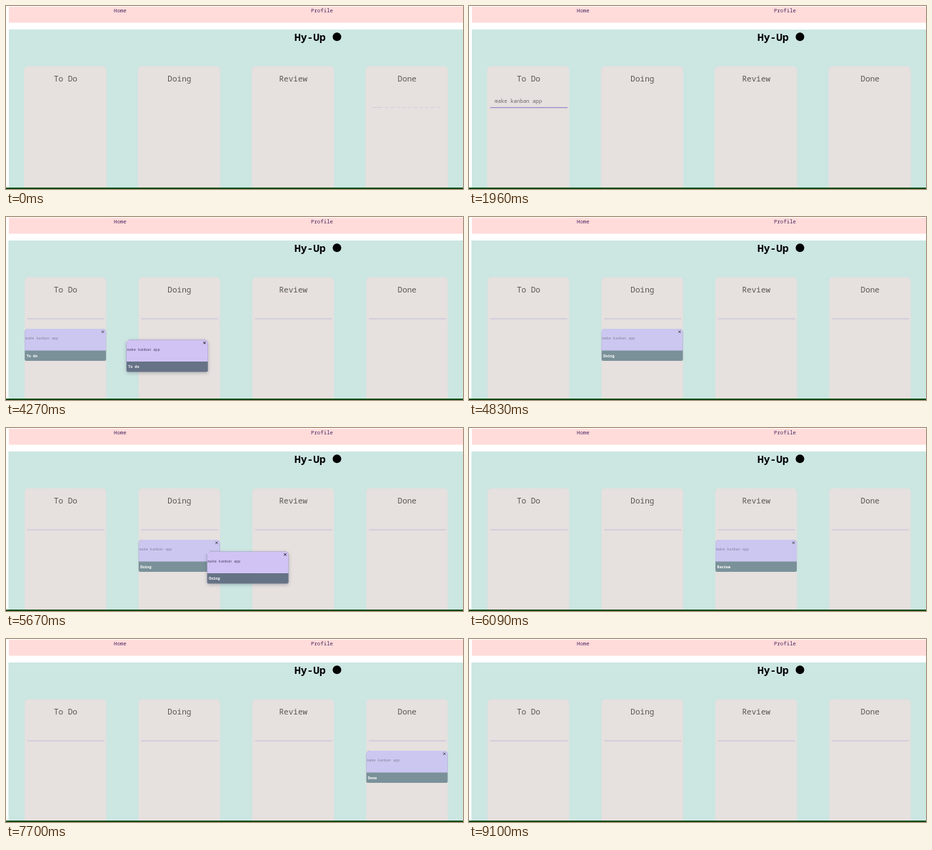
Write an HTML page with a canvas that moves like this. It is 640 by 257 pixels and loops after 9.59 s.

```html
<!DOCTYPE html>
<html lang="en">
<head>
<meta charset="utf-8">
<title>Kanban board</title>
<style>
  html, body { margin: 0; width: 100%; height: 100%; overflow: hidden; background: #fff; }
  canvas { display: block; width: 100vw; height: 100vh; }
</style>
</head>
<body>
<canvas id="stage"></canvas>
<script>
const W = 640, H = 257, LOOP = 9590, STEP = 70;
const MONO = '"Noto Sans Mono", "DejaVu Sans Mono", monospace';
const TITLES = ['To Do', 'Doing', 'Review', 'Done'];
const STATUS = ['To do', 'Doing', 'Review', 'Done'];
const TASK = 'make kanban app';
const SUBMIT = 2170, GRAB_FOCUS = 3780, REMOVE = 8750;
const CARD = { w: 114, h: 45, top: 157, head: 30.5 };

const DIM = { head: '#cbc7f0', foot: '#7a9199', text: '#88829f', cross: '#45454f' };
const BRIGHT = { head: '#d7c8fa', foot: '#626f83', text: '#4a3d60', cross: '#111' };
const PALE = { head: '#dacef1', foot: '#768b96', text: '#6d637f', cross: '#333' };

// Each drag: column it starts in, hover and drop times, path points [time, dx, dy].
const DRAGS = [
  { from: 0, hover: 3780, drop: 4480, skin: BRIGHT,
    path: [[3920, 4, 1], [4060, 52, 8], [4270, 142.5, 15.5], [4410, 160, 17]] },
  { from: 1, hover: 5390, drop: 5950, skin: BRIGHT,
    path: [[5530, 8, 2], [5670, 96, 16.5], [5810, 154, 19], [5880, 160, 19]] },
  { from: 2, hover: 6930, drop: 7420, skin: PALE,
    path: [[7000, 32, 8], [7070, 95.5, 23.5], [7210, 155, 25], [7350, 162, 24]] }
];

const canvas = document.getElementById('stage');
const ctx = canvas.getContext('2d');

const clamp = (v, lo, hi) => Math.max(lo, Math.min(hi, v));
const columnX = i => 26.2 + i * 159.45;

function rect(x, y, w, h, color) {
  ctx.fillStyle = color;
  ctx.fillRect(x, y, w, h);
}

function round(x, y, w, h, r, color) {
  ctx.fillStyle = color;
  ctx.beginPath();
  ctx.roundRect(x, y, w, h, r);
  ctx.fill();
}

function label(str, x, y, size, color, weight = 400, align = 'left') {
  ctx.font = `${weight} ${size}px ${MONO}`;
  ctx.textAlign = align;
  ctx.fillStyle = color;
  ctx.fillText(str, x, y);
}

function shadow(color, blur, dy = 0) {
  const scale = canvas.width / W;
  ctx.shadowColor = color;
  ctx.shadowBlur = blur * scale;
  ctx.shadowOffsetY = dy * scale;
}

function pathAt(points, t) {
  for (let i = 1; i < points.length; i++) {
    const [t0, x0, y0] = points[i - 1], [t1, x1, y1] = points[i];
    if (t < t1) {
      const u = (t - t0) / (t1 - t0);
      return [x0 + (x1 - x0) * u, y0 + (y1 - y0) * u];
    }
  }
  return points[points.length - 1].slice(1);
}

function typedCount(t) {
  return clamp(Math.floor((t - 70) / STEP), 0, 8)
    + (t >= 980 ? 1 : 0)
    + clamp(Math.floor((t - 1050) / STEP), 0, 6);
}

function card(x, y, status, skin, alpha = 1, lifted = false) {
  const { w, h, head } = CARD;
  ctx.save();
  ctx.globalAlpha = alpha;
  if (lifted) {
    rect(x, y, 4, 4, 'rgba(255,255,255,.6)');
    shadow('rgba(60,70,90,.35)', 5, 1.5);
  }
  round(x, y, w, h, [5, 5, 2, 2], skin.foot);
  shadow('transparent', 0);
  round(x, y, w, head, [5, 5, 0, 0], skin.head);
  label(TASK, x + 0.9, y + 15.3, 5.1, skin.text);
  label(status, x + 2.5, y + 39.9, 5.1, '#fff', 700);
  ctx.strokeStyle = skin.cross;
  ctx.lineWidth = 1;
  ctx.beginPath();
  ctx.moveTo(x + 107.7, y + 2.6);
  ctx.lineTo(x + 110.9, y + 5.8);
  ctx.moveTo(x + 110.9, y + 2.6);
  ctx.lineTo(x + 107.7, y + 5.8);
  ctx.stroke();
  ctx.restore();
}

function page(t) {
  const fresh = t < SUBMIT;
  rect(0, 0, W, H, '#fff');
  rect(4, 1, W, 22.5, '#ffdcda');
  label('Home', 151, 8.6, 7.4, '#4b2461');
  label('Profile', 427, 8.6, 7.4, '#4b2461');
  rect(fresh ? 4 : 3.4, 33, W, 222, '#cce6e2');
  label('Hy-Up', 404, 48.8, 14.6, '#000', 600);
  ctx.fillStyle = '#000';
  ctx.beginPath();
  ctx.arc(463.5, 43.2, 6, 0, 2 * Math.PI);
  ctx.fill();

  ctx.save();
  ctx.beginPath();
  ctx.rect(0, 0, W, 255);
  ctx.clip();
  TITLES.forEach((title, i) => {
    const x = columnX(i);
    if (fresh) {
      round(x - 0.9, 84.5, 115.2, 180, 6, '#e6e0de');
    } else {
      shadow('rgba(225,225,222,.8)', 3);
      round(x + 0.2, 85, 113.6, 180, 5, '#e6e0de');
      shadow('transparent', 0);
    }
    label(title, x + 57.2, 105.8, 11, '#585654', 400, 'center');
  });
  ctx.restore();
  rect(0, 255, W, 2, '#0b4a13');
}

function fields(t) {
  if (t < 70) {
    rect(513, 142, 14, 0.8, '#cdc9e2');
    for (let x = 531; x < 608; x += 8) rect(x, 142, 5, 0.8, '#cdc9e2');
  }
  if (t >= SUBMIT) {
    ctx.globalAlpha = clamp((t - SUBMIT + STEP) / 280, 0, 1);
    TITLES.forEach((_, i) => rect(columnX(i) + 3.7, 142, 108, 1.8, '#d2cede'));
    ctx.globalAlpha = 1;
  }
  if (t < 70 || t >= GRAB_FOCUS) return;

  const grow = clamp((t - 70 + STEP) / 210, 0, 1);
  rect(83.9 - 54 * grow, 142, 108 * grow, 1.3, '#9b8cc6');
  const str = t < SUBMIT ? TASK.slice(0, typedCount(t)) : '';
  label(str, 36, 136.4, 7.35, '#6b6769');
  const caret = t < 1960 || (t >= 2450 && t < 2940) || (t >= 3220 && t < 3500);
  if (caret) rect(36 + str.length * 4.41, 130, 0.8, 9, '#55525a');
}

function task(t) {
  if (t < SUBMIT || t >= REMOVE) return;
  const col = DRAGS.filter(d => t >= d.drop).length;
  const x = columnX(col), y = CARD.top;
  card(x, y, STATUS[col], DIM, clamp((t - SUBMIT + STEP) / 280, 0, 1));

  const drag = DRAGS[col];
  if (!drag || t < drag.hover) return;
  const start = drag.path[0][0];
  if (t < start) {
    card(x, y, STATUS[col], drag.skin, clamp((t - drag.hover + STEP) / 140, 0, 1));
  } else {
    const [dx, dy] = pathAt(drag.path, t);
    card(x + dx, y + dy, STATUS[col], drag.skin, 0.95, true);
  }
}

function resize() {
  const ratio = window.devicePixelRatio || 1;
  canvas.width = Math.round(innerWidth * ratio);
  canvas.height = Math.round(innerHeight * ratio);
}

function draw(now) {
  const t = Math.floor(((now - began) % LOOP + 0.01) / STEP) * STEP;
  ctx.setTransform(canvas.width / W, 0, 0, canvas.height / H, 0, 0);
  page(t);
  fields(t);
  task(t);
  requestAnimationFrame(draw);
}

addEventListener('resize', resize);
resize();
const began = 0;
draw(performance.now());
</script>
</body>
</html>
```
